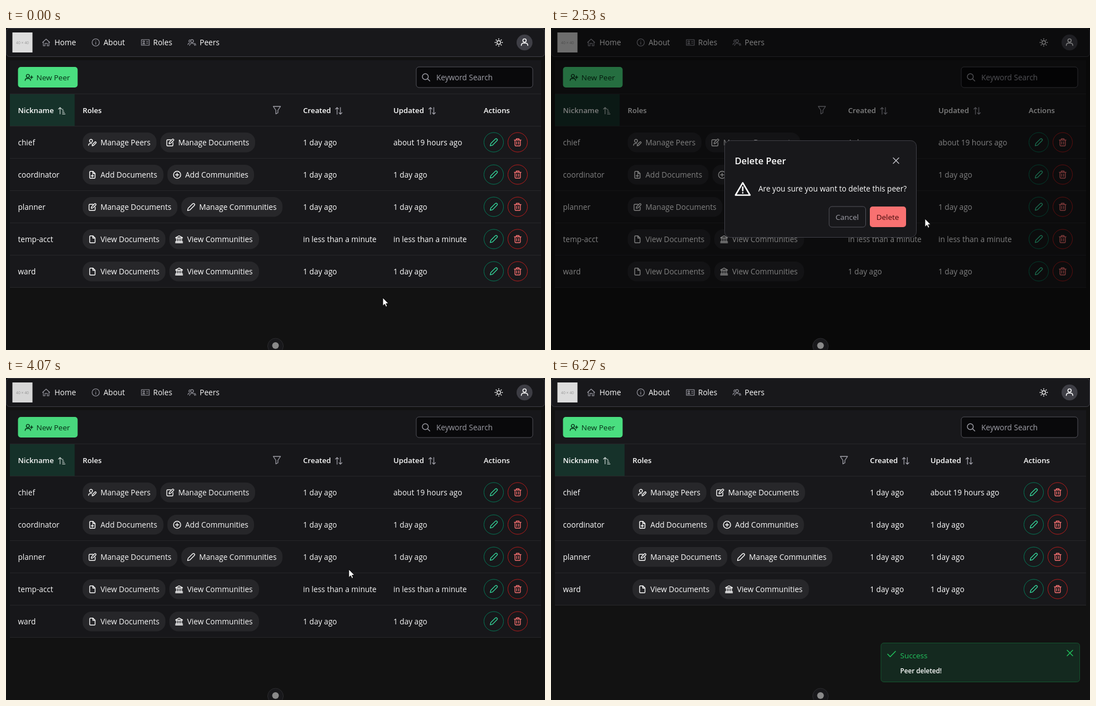
Recreate the animation shown at these times as an HTML page. Size 967 by 579 pixels, loop 6.8 s.

```html
<!DOCTYPE html>
<html lang="en">
<head>
<meta charset="utf-8">
<title>Account table</title>
<style>
html, body { margin: 0; width: 100%; height: 100%; overflow: hidden; background: #121212; }
svg { display: block; width: 100vw; height: 100vh; }
text { font-family: "Open Sans", "Noto Sans", sans-serif; font-size: 13.6px; fill: #fff; white-space: pre; }
.head { font-size: 13.2px; font-weight: 600; }
.label { font-size: 13.5px; font-weight: 500; }
.icon { fill: none; stroke-linecap: round; stroke-linejoin: round; }
</style>
</head>
<body>
<svg id="stage" viewBox="0 0 967 579" xmlns="http://www.w3.org/2000/svg"></svg>
<script>
const LOOP = 6800, STEP = 1000 / 15;
const GREY = '#a1a1aa', LINE = '#27272a', PANEL = '#18181b';

// Icon outlines, centred on 0,0
const ICONS = {
  home: 'M-6.5 0L0-6 6.5 0M-5-1V6H-2V1.5H2V6H5V-1',
  info: 'M-6.5 0A6.5 6.5 0 1 1 6.5 0A6.5 6.5 0 1 1-6.5 0M0-.5V3.2M0-3.2V-2.8',
  card: 'M-7-5H7V5H-7ZM-4.8 2.8Q-2.8-.2-.8 2.8ZM-4.2-1.6A1.4 1.4 0 1 1-1.4-1.6A1.4 1.4 0 1 1-4.2-1.6M2-1.8H4.8M2 1.2H4.8',
  group: 'M-2.2-2.5A2.6 2.6 0 1 1 3-2.5A2.6 2.6 0 1 1-2.2-2.5M-4 5.5Q-4 1.8 0 1.8H1Q5 1.8 5 5.5M-3.2-4.6A2 2 0 1 0-3.6-.6M-7 4Q-7 1.4-4.6 1.2M5 1.5Q7 2.2 7 5',
  sun: 'M-3.2 0A3.2 3.2 0 1 1 3.2 0A3.2 3.2 0 1 1-3.2 0M0-6.8V-5.6M0 5.6V6.8M-6.8 0H-5.6M5.6 0H6.8M-4.8-4.8L-4-4M4 4L4.8 4.8M-4.8 4.8L-4 4M4-4L4.8-4.8',
  person: 'M-3-3A3 3 0 1 1 3-3A3 3 0 1 1-3-3M-5.8 6Q-5.8 1.8-2 1.8H2Q5.8 1.8 5.8 6',
  addPerson: 'M-4.6-2.8A2.8 2.8 0 1 1 1-2.8A2.8 2.8 0 1 1-4.6-2.8M-6.6 5.5Q-6.6 1.8-3 1.8H-.5Q3 1.8 3 5.5M4.8-3V2M2.6-.5H7',
  editPerson: 'M-5.2-3A2.7 2.7 0 1 1 .2-3A2.7 2.7 0 1 1-5.2-3M-6.8 5Q-6.8 1.6-3.6 1.6H-1.6M-.5 5.8L0 3.4 4.6-1.2Q6-2 6.6-.4L6.7.6 2 5.3Z',
  search: 'M-6.5-1A5.3 5.3 0 1 1 4.1-1A5.3 5.3 0 1 1-6.5-1M3 3L6.8 6.8',
  asc: 'M-3-6V5.5M-5.8-3.2L-3-6-.2-3.2M1.2-2.5H2.2M1.2.2H3.4M1.2 2.9H4.6M1.2 5.6H6',
  sort: 'M-3 6V-6M-5.8-3.2L-3-6-.4-3.4M3-6V6M.4 3.4L3 6 5.8 3.2',
  filter: 'M-6.5-6.5H6.5L1.8.5V5L-1.8 7V.5Z',
  edit: 'M1-5H-4.5Q-6-5-6-3.5V4.5Q-6 6-4.5 6H3.5Q5 6 5 4.5V0M-2 2.2L-1.5-.6 4.2-6.2Q5.6-6.8 6.5-5.2L6.4-4 .8 1.6Z',
  pencil: 'M-6.2 6.2L-5.3 2.3 3-6Q4.5-7 5.9-5.7T6-2.9L-2.3 5.4Z',
  file: 'M-4.8-5Q-4.8-6.3-3.5-6.3H1L4.8-2.5V5Q4.8 6.3 3.5 6.3H-3.5Q-4.8 6.3-4.8 5ZM.8-6V-2.3H4.6',
  addFile: 'M-4.8-5Q-4.8-6.3-3.5-6.3H1L4.8-2.5V5Q4.8 6.3 3.5 6.3H-3.5Q-4.8 6.3-4.8 5ZM.8-6V-2.3H4.6M0-.6V4M-2.3 1.7H2.3',
  plus: 'M-6.5 0A6.5 6.5 0 1 1 6.5 0A6.5 6.5 0 1 1-6.5 0M0-3V3M-3 0H3',
  hall: 'M-6-2.5V-3.2L0-6.3 6-3.2V-2.5ZM-4.5-2V4M-1.5-2V4M1.5-2V4M4.5-2V4M-6.3 4.2H6.3M-6.3 6.3H6.3',
  trash: 'M-6-4H6M-2.5-4V-6.3H2.5V-4M-4.8-4V5Q-4.8 6.5-3.4 6.5H3.4Q4.8 6.5 4.8 5V-4M-1.7-1V3.5M1.7-1V3.5',
  close: 'M-5-5L5 5M5-5L-5 5',
  check: 'M-7 0L-2.5 4.8 7-5',
  warn: 'M0-11.2L13 11H-13ZM0-3.5V3M0 6.8V7'
};

const icon = (name, x, y, color = '#fff', width = 1.3) =>
  `<path class="icon" d="${ICONS[name]}" transform="translate(${x} ${y})" stroke="${color}" stroke-width="${width}"/>`;
const text = (s, x, y, cls = '', style = '') =>
  `<text x="${x}" y="${y}" class="${cls}" style="${style}">${s}</text>`;
const rect = (x, y, w, h, r, fill, stroke = 'none', extra = '') =>
  `<rect x="${x}" y="${y}" width="${w}" height="${h}" rx="${r}" fill="${fill}" stroke="${stroke}" ${extra}/>`;
const ring = (x, y, color, fill = 'none', extra = '') =>
  `<circle cx="${x}" cy="${y}" r="17.5" fill="${fill}" stroke="${color}" ${extra}/>`;

// Chip: icon, label, offset in the column, width
const CHIPS = {
  people: ['editPerson', 'Manage Peers', 0, 132.5],
  editDocs: ['edit', 'Manage Documents', 139.5, 170],
  addDocs: ['addFile', 'Add Documents', 0, 145],
  addGroups: ['plus', 'Add Communities', 152, 155.5],
  allDocs: ['edit', 'Manage Documents', 0, 170],
  allGroups: ['pencil', 'Manage Communities', 177, 181.5],
  seeDocs: ['file', 'View Documents', 0, 148.5],
  seeGroups: ['hall', 'View Communities', 155.5, 161]
};
const DAY = '1 day ago', SOON = 'in less than a minute';
const ROWS = [
  ['chief', 'people', 'editDocs', DAY, 'about 19 hours ago'],
  ['coordinator', 'addDocs', 'addGroups', DAY, DAY],
  ['planner', 'allDocs', 'allGroups', DAY, DAY],
  ['temp-acct', 'seeDocs', 'seeGroups', SOON, SOON],
  ['ward', 'seeDocs', 'seeGroups', DAY, DAY]
];

function chip(key, x, y) {
  const [name, label, dx, w] = CHIPS[key];
  return rect(x + dx, y - 18, w, 35.5, 16, LINE) +
    icon(name, x + dx + 17.5, y, '#fff', 1.4) + text(label, x + dx + 32, y + 5);
}

function table(rows, col) {
  let s = rect(7, 58, 953, 61 + 58 * (rows.length + 1), 0, PANEL) +
    rect(7, 119, col.roles - 14.3 - 7, 57, 0, '#16322a') +
    text('Nickname', 21.5, 153, 'head') + icon('asc', 100, 149, '#c5d0cc') +
    text('Roles', col.roles, 153, 'head') + icon('filter', col.filter, 147.5, GREY) +
    text('Created', col.created, 153, 'head') + icon('sort', col.created + 64, 149, GREY) +
    text('Updated', col.updated, 153, 'head') + icon('sort', col.updated + 69.5, 149, GREY) +
    text('Actions', col.actions, 153, 'head');
  for (let i = 0; i < rows.length + 2; i++) s += rect(7, 118 + 58 * i, 953, 1, 0, LINE);
  rows.forEach(([name, a, b, made, changed], i) => {
    const y = 206 + 58 * i, x = col.actions + 18;
    s += text(name, 21.5, y + 5) + chip(a, col.roles, y) + chip(b, col.roles, y) +
      text(made, col.created, y + 5) + text(changed, col.updated, y + 5) +
      ring(x, y - .5, '#047857') + icon('pencil', x, y - .5, '#34d399', 1.4) +
      ring(x + 43, y - .5, '#b91c1c') + icon('trash', x + 43, y - .5, '#f87171', 1.4);
  });
  return s;
}

function tooltip(id, label, x, y, w) {
  return `<g id="${id}">` + rect(x, y, w, 35.5, 5, '#3f3f46') + text(label, x + 10.7, y + 22.8) + '</g>';
}

const nav = [['home', 'Home', 72, 87], ['info', 'About', 161, 175], ['card', 'Roles', 250, 264], ['group', 'Peers', 333.5, 347.5]];

const header =
  rect(.5, .5, 966, 51, 6, PANEL, '#3f3f46') +
  rect(11.5, 8, 36, 36, 0, '#dcdcdc') +
  text('40 × 40', 29.5, 28.5, '', 'font-size:6.8px;fill:#969696;text-anchor:middle') +
  nav.map(([n, s, ix, x]) => icon(n, ix, 26, GREY, 1.1) + text(s, x, 31)).join('') +
  icon('sun', 884, 26, '#fff', 1.4) +
  '<circle cx="930.3" cy="26" r="14.3" fill="#3f3f46"/>' + icon('person', 930.3, 25.5, '#fff', 1.5);

const toolbar =
  rect(21.5, 70, 107, 37, 5, '#4ade80') + icon('addPerson', 41, 89, '#052e16', 1.4) +
  text('New Peer', 54.5, 94, 'label', 'fill:#052e16') +
  rect(736, 70, 209, 37, 5, '#09090b', '#52525b') + icon('search', 753.5, 88.5, GREY, 1.4) +
  text('Keyword Search', 772, 94, '', 'fill:#a1a1aa');

const dialog = '<g id="dialog">' +
  rect(311.5, 202.5, 344, 174, 10, PANEL, '#3f3f46') +
  text('Delete Peer', 329.8, 245.3, '', 'font-size:16.4px;font-weight:600') +
  icon('close', 619, 238.5, '#c4c4cb', 1.4) + icon('warn', 344, 289.5, '#fff', 2.6) +
  text('Are you sure you want to delete this peer?', 372, 294) +
  rect(499, 321, 65.5, 37, 5, 'none', '#52525b') + text('Cancel', 510.5, 345, 'label', 'fill:#a1a1aa') +
  rect(572, 321, 65, 37, 5, '#f87171', 'none', 'id="confirm"') +
  text('Delete', 583.7, 345, 'label', 'fill:#450a0a') + '</g>';

const toast = '<g id="toast">' +
  rect(592, 476.5, 356.5, 70, 5, '#14291f', '#15532f') +
  icon('check', 611, 496.5, '#22c55e', 1.5) +
  text('Success', 626.5, 504, 'label', 'fill:#22c55e') +
  text('Peer deleted!', 626.5, 531, '', 'font-size:11.7px;font-weight:600') +
  icon('close', 931, 494.5, '#22c55e', 1.4) + '</g>';

const badge = '<circle cx="483.5" cy="572" r="14" fill="#18181b" stroke="#2c2c2f"/>' +
  '<circle cx="483.5" cy="571" r="6" fill="#8a8a8a"/>';

const pointer = '<g id="cursor"><path id="arrow" fill="#fff" stroke="#000" stroke-width=".9" ' +
  'd="M0 0V14.6L3.4 11.5 5.7 16.4 8 15.3 5.8 10.6H10.3Z"/>' +
  '<path id="hand" fill="#fff" stroke="#000" stroke-linejoin="round" d="M-1.5 0Q0-2.5 1.6 0V5.5' +
  'Q3.2 4.2 4.3 6 5.6 5 6.7 6.8 8.8 6 8.8 8.6V12.5Q8.8 17.8 4.5 17.8H1.5Q-.5 17.8-1.8 15.5L-5.4 10.6Q-5.8 8.3-3.6 9L-1.5 11Z' +
  'M1.6 5.5V9.5M4.3 6V9.5M6.7 6.8V9.8"/></g>';

const stage = document.getElementById('stage');
stage.innerHTML =
  '<g id="before">' + table(ROWS, { roles: 137.5, filter: 486, created: 533, updated: 695, actions: 857 }) +
  ring(918, 379.5, 'none', '#f87171', 'id="hover"') + '</g>' +
  '<g id="after">' + table(ROWS.filter((r, i) => i !== 3), { roles: 146.3, filter: 525.5, created: 572.3, updated: 680.8, actions: 848 }) + '</g>' +
  header + toolbar + rect(0, 0, 967, 579, 0, '#000', 'none', 'id="mask"') + dialog + toast +
  tooltip('tipDelete', 'Delete', 886.5, 409, 63) +
  tooltip('tipDate', '4/11/2025, 10:30:13 AM', 517.5, 392.5, 172) + badge + pointer;

const el = {};
stage.querySelectorAll('[id]').forEach(n => el[n.id] = n);

// Cubic bezier timing curve
function bezier(x1, y1, x2, y2) {
  const at = (a, b, u) => 3 * a * u * (1 - u) ** 2 + 3 * b * u * u * (1 - u) + u ** 3;
  return p => {
    let lo = 0, hi = 1;
    for (let i = 0; i < 24; i++) {
      const mid = (lo + hi) / 2;
      if (at(x1, x2, mid) < p) lo = mid; else hi = mid;
    }
    return at(y1, y2, lo);
  };
}
const linear = p => p, smooth = p => p * p * (3 - 2 * p);
const ease = bezier(.25, .1, .25, 1), enter = bezier(0, 0, .2, 1), leave = bezier(.4, 0, .2, 1);
const ramp = (t, start, length, curve = linear) => curve(Math.min(1, Math.max(0, (t - start) / length)));

// Pointer path: time, x, y, curve towards the point
const PATH = [
  [133, 676, 485], [733, 925, 377, smooth], [867, 919, 388], [2200, 919, 388],
  [2333, 852, 374], [2533, 671, 343], [2733, 638, 346], [2933, 631, 346],
  [3267, 615, 344], [4667, 615, 344], [5000, 620, 384, smooth], [5267, 620, 390],
  [5400, 511, 444], [5600, 186, 568]
];
function pointerAt(t) {
  if (t <= PATH[0][0]) return PATH[0].slice(1);
  const i = PATH.findIndex(p => p[0] >= t);
  if (i < 0) return PATH[PATH.length - 1].slice(1);
  const [t0, x0, y0] = PATH[i - 1], [t1, x1, y1, curve] = PATH[i];
  const p = ramp(t, t0, t1 - t0, curve);
  return [x0 + (x1 - x0) * p, y0 + (y1 - y0) * p];
}

const mix = (a, b, p) => a.map((v, i) => v + (b[i] - v) * p);
const show = (node, on) => node.setAttribute('display', on ? 'inline' : 'none');
function fade(node, amount) {
  show(node, amount > 0);
  node.setAttribute('opacity', amount);
}

function draw(t) {
  const swapped = t >= 4195;
  show(el.before, !swapped);
  show(el.after, swapped);

  fade(el.hover, .08 * (ramp(t, 800, 200) - ramp(t, 1800, 200)));
  fade(el.tipDelete, t < 1795 ? ramp(t, 870, 270) : 0);
  fade(el.tipDate, t < 5325 ? ramp(t, 4900, 270) : 0);

  fade(el.mask, .5 * (ramp(t, 1840, 220, ease) - ramp(t, 3910, 220, ease)));
  const open = ramp(t, 1867, 180, enter) - ramp(t, 3920, 150, leave);
  fade(el.dialog, open);
  el.dialog.setAttribute('transform', `translate(483.5 289.5) scale(${.7 + .3 * open}) translate(-483.5 -289.5)`);
  const warm = mix([248, 113, 113], [252, 165, 165], ramp(t, 2800, 400));
  el.confirm.setAttribute('fill', `rgb(${mix(warm, [254, 202, 202], ramp(t, 3860, 130))})`);

  const rise = ramp(t, 4200, 300, ease);
  fade(el.toast, rise);
  el.toast.setAttribute('transform', `translate(0 ${35.5 * (1 - rise)})`);

  const [x, y] = pointerAt(t);
  const hand = t > 725 && t < 1850 || t > 2760 && t < 3990;
  show(el.cursor, t < 5660);
  el.cursor.setAttribute('transform', `translate(${x} ${y})`);
  show(el.hand, hand);
  show(el.arrow, !hand);
}

const start = performance.now();
function tick() {
  const t = (performance.now() - start) % LOOP;
  draw(Math.floor((t + 5) / STEP) * STEP);
  requestAnimationFrame(tick);
}
tick();
</script>
</body>
</html>
```
